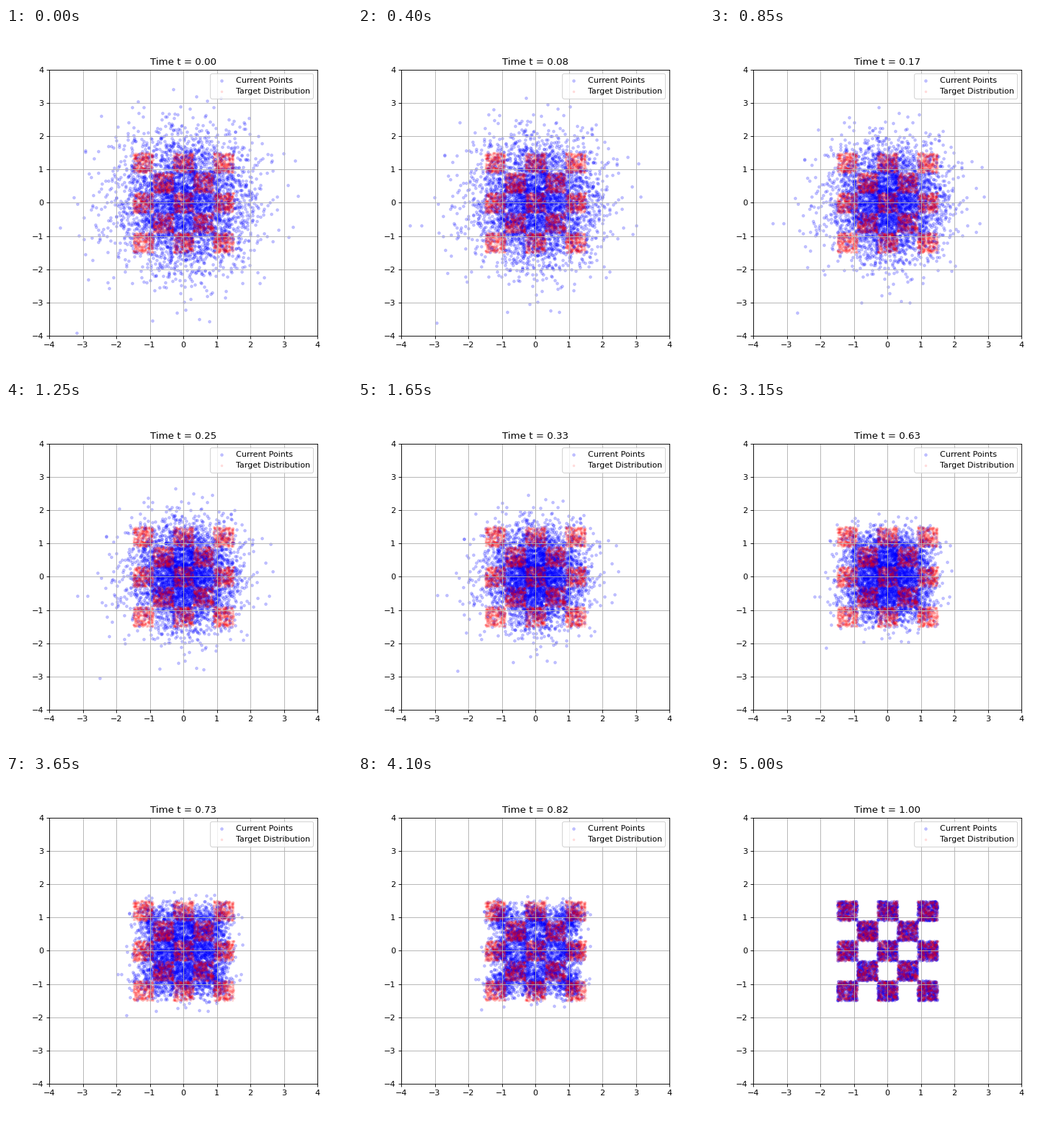
Animation, 480 px wide and 480 px high, one loop 5050 ms. Source, as a matplotlib script:

```python
import math

import matplotlib.pyplot as plt
import numpy as np
from matplotlib.animation import FuncAnimation

STEPS = 100
COUNT = 4000
EDGES = np.linspace(-1.5, 1.5, 6)

rng = np.random.default_rng(4)
erf = np.vectorize(math.erf, otypes=[float])


def sample_normal(n):
    return rng.standard_normal((n, 2))


def sample_checkers(n):
    pts = rng.uniform(-1.5, 1.5, (3 * n, 2))
    cell = np.floor((pts + 1.5) / 0.6).astype(int)
    return pts[cell.sum(axis=1) % 2 == 0][:n]


def band_moments(mu, s):
    """Mass and first moment of N(mu, s) over the even and odd bands."""
    z = (EDGES - mu[:, None]) / s
    mass = np.diff(erf(z / math.sqrt(2)) / 2, axis=1)
    pdf = np.exp(-z * z / 2) / math.sqrt(2 * math.pi)
    first = mu[:, None] * mass - s * np.diff(pdf, axis=1)
    return [(mass[:, k::2].sum(axis=1), first[:, k::2].sum(axis=1)) for k in (0, 1)]


def expected_end(pts, t):
    """Mean checkerboard point for a straight path passing through pts at t."""
    t = max(t, 0.01)
    s = max((1 - t) / t, 0.01)
    (ex, emx), (ox, omx) = band_moments(pts[:, 0] / t, s)
    (ey, emy), (oy, omy) = band_moments(pts[:, 1] / t, s)
    mass = ex * ey + ox * oy
    ok = mass > 1e-20
    safe = np.where(ok, mass, 1)
    mean = np.column_stack([emx * ey + omx * oy, ex * emy + ox * omy]) / safe[:, None]
    return np.where(ok[:, None], np.clip(mean, -1.5, 1.5), pts)


def velocity(pts, t):
    return (expected_end(pts, t) - pts) / (1 - t)


def integrate(pts):
    dt = 1 / STEPS
    path = [pts]
    for i in range(STEPS):
        t = i * dt
        mid = pts + velocity(pts, t) * dt / 2
        pts = pts + velocity(mid, t + dt / 2) * dt
        path.append(pts)
    return path


path = integrate(sample_normal(COUNT))
target = sample_checkers(COUNT)

fig, ax = plt.subplots(figsize=(6, 6), dpi=80)
current = ax.scatter(*path[0].T, s=10, color="blue", alpha=0.2, label="Current Points")
ax.scatter(*target.T, s=5, color="red", alpha=0.1, label="Target Distribution")
ax.set_xlim(-4, 4)
ax.set_ylim(-4, 4)
ax.grid(True)
ax.legend(loc="upper right")
title = ax.set_title("Time t = 0.00")


def update(i):
    current.set_offsets(path[i])
    title.set_text(f"Time t = {i / STEPS:.2f}")
    return current, title


anim = FuncAnimation(fig, update, frames=STEPS + 1, interval=50, repeat=True, repeat_delay=0)
plt.show()
```
